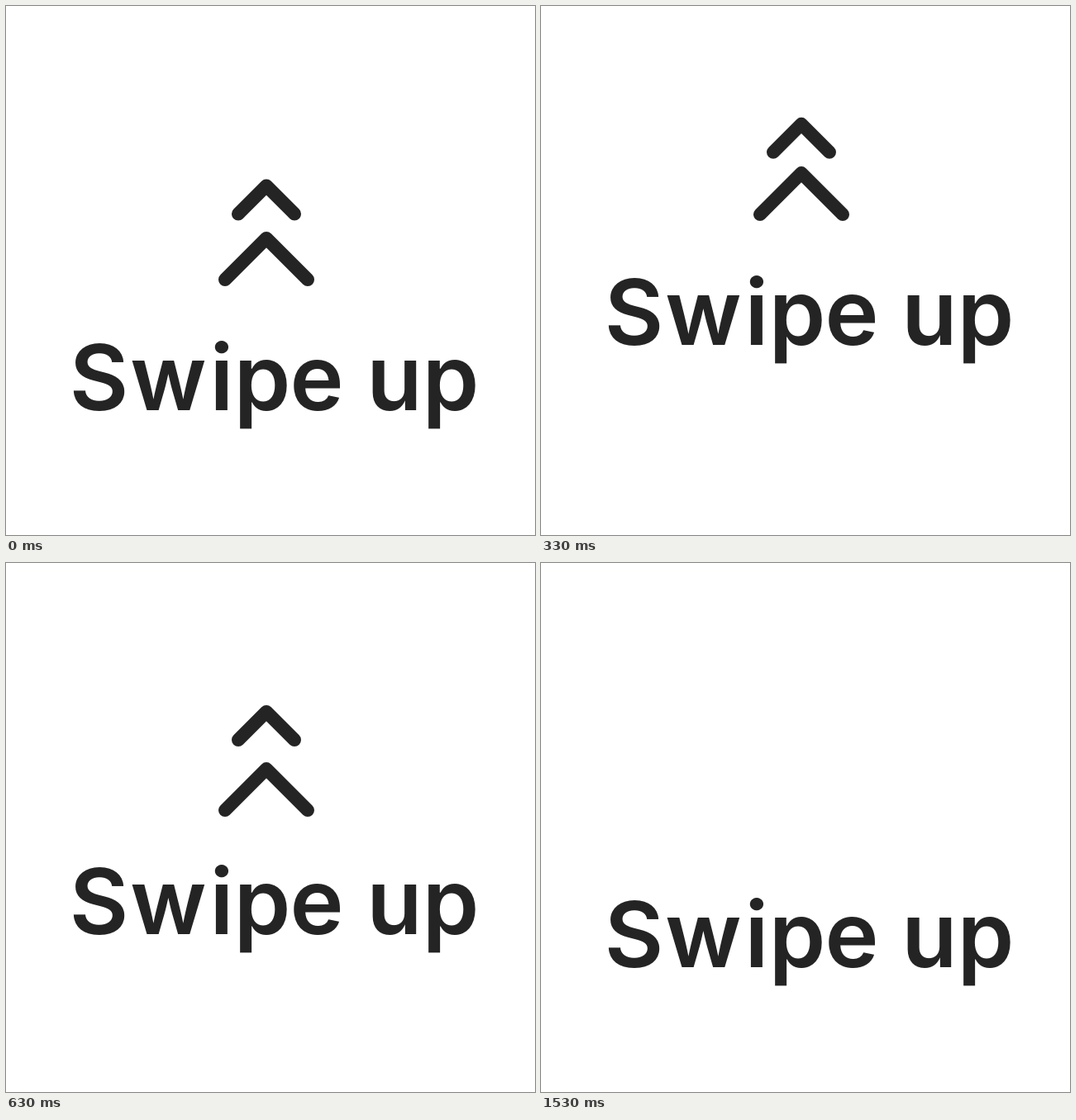
An HTML page for the animation above (1560 ms loop, 640x640 px).

```html
<!DOCTYPE html>
<html lang="en">
<head>
<meta charset="utf-8">
<title>Swipe up</title>
<style>
  html, body { margin: 0; width: 100%; height: 100%; overflow: hidden; background: #fff; }
  svg { display: block; width: 100%; height: 100%; }
  path { fill: none; stroke: #242424; stroke-width: 16; stroke-linecap: round; stroke-linejoin: round; }
  text { fill: #242424; font: 600 110px Inter, "Open Sans", sans-serif; text-anchor: middle; }
</style>
</head>
<body>
<svg viewBox="0 0 640 640">
  <g id="arrows">
    <path id="small" d="M281 251.5 L315 217.5 L349 251.5"/>
    <path id="big" d="M265 331 L315 281 L365 331"/>
  </g>
  <text id="label" y="489" x="112.5 196.5 261 310 376 423 470 538">Swipe up</text>
</svg>
<script>
  const LOOP = 1560, STEP = 30, END = 900, HIDE = 1530, LIFT = 81;
  const byId = id => document.getElementById(id);

  const smooth = s => s * s * (3 - 2 * s);
  const softStart = s => s * s * (2 - s);

  // Each part rises to its own peak time, then all settle together.
  const parts = [
    { el: byId("small"), peak: 180, fall: softStart },
    { el: byId("big"), peak: 270, fall: smooth },
    { el: byId("label"), peak: 360, fall: smooth }
  ];
  const arrows = byId("arrows");

  function lift(t, { peak, fall }) {
    if (t >= END) return 0;
    if (t < peak) return LIFT * smooth(t / peak);
    return LIFT * (1 - fall((t - peak) / (END - peak)));
  }

  function draw(now) {
    const t = Math.floor((now % LOOP) / STEP) * STEP;
    for (const p of parts) {
      p.el.setAttribute("transform", `translate(0 ${-lift(t, p).toFixed(2)})`);
    }
    arrows.setAttribute("visibility", t >= HIDE ? "hidden" : "visible");
  }

  let start;
  function tick(now) {
    start ??= now;
    draw(now - start);
    requestAnimationFrame(tick);
  }
  draw(0);
  requestAnimationFrame(tick);
</script>
</body>
</html>
```
